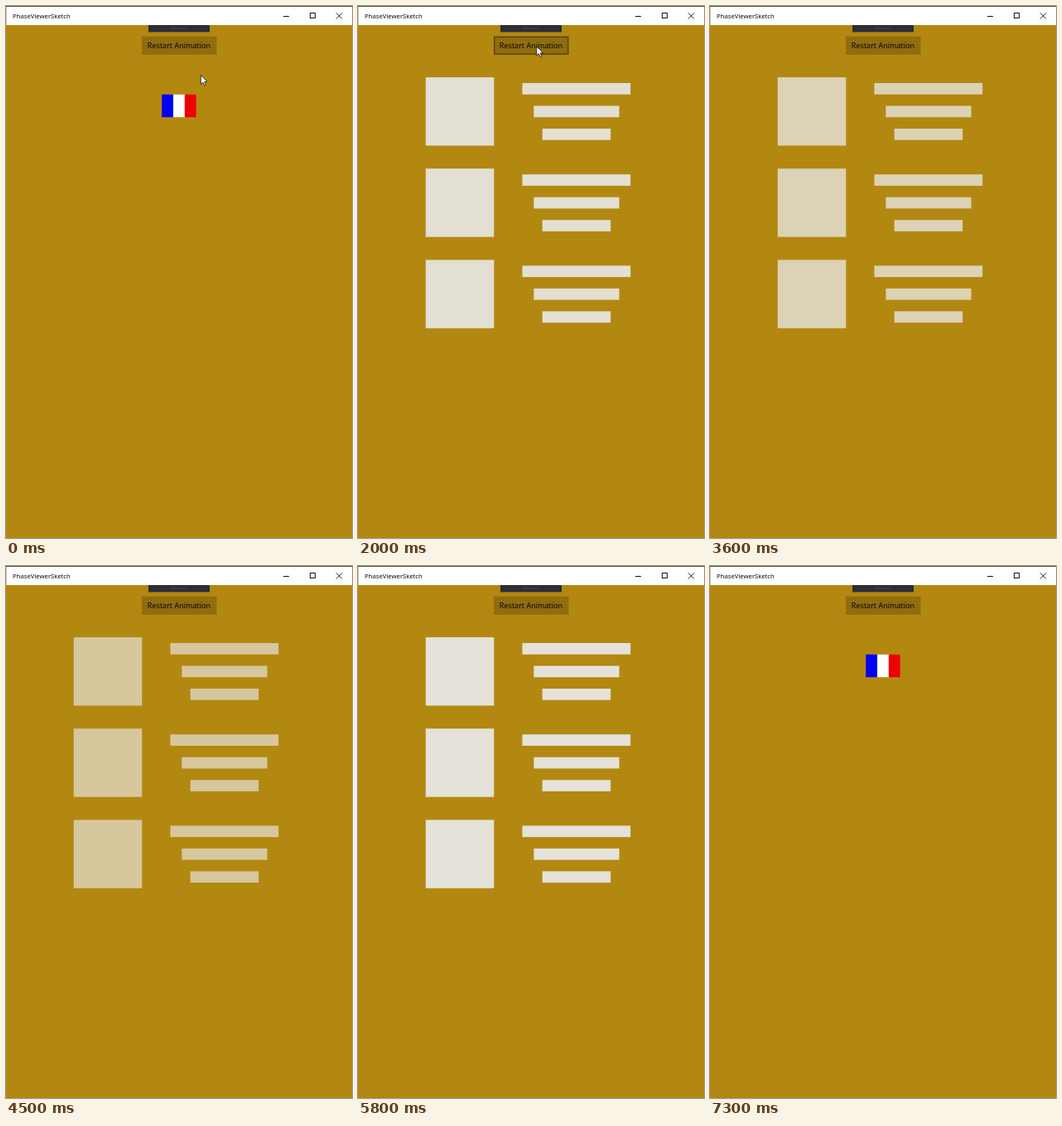
An HTML page with a canvas for the animation above (7.4 s loop, 418 by 642 pixels).

```html
<!DOCTYPE html>
<html lang="en">
<head>
<meta charset="utf-8">
<title>Loader</title>
<style>
html, body { margin: 0; width: 418px; height: 642px; overflow: hidden; background: #b38811; }
canvas { display: block; }
</style>
</head>
<body>
<canvas id="stage" width="418" height="642"></canvas>
<script>
const ctx = document.getElementById('stage').getContext('2d');
const LOOP = 7400;
const LOAD_START = 1944, LOAD_END = 6944, HALF = 500;
const CURSOR_END = 2700;
const FONT = '"Open Sans", "Noto Sans", sans-serif';

// time, x, y of the pointer tip
const path = [
  [300, 235, 83], [600, 224, 61], [950, 224, 61],
  [1300, 211, 22], [1500, 211, 22], [1850, 215.5, 48.5]
];

function rect(x, y, w, h, color) {
  ctx.fillStyle = color;
  ctx.fillRect(x, y, w, h);
}

function line(color, ...points) {
  ctx.strokeStyle = color;
  ctx.lineWidth = 1;
  ctx.beginPath();
  for (const [x1, y1, x2, y2] of points) {
    ctx.moveTo(x1, y1);
    ctx.lineTo(x2, y2);
  }
  ctx.stroke();
}

function text(str, x, y, size, align) {
  ctx.font = `${size}px ${FONT}`;
  ctx.textAlign = align;
  ctx.fillStyle = '#000';
  ctx.fillText(str, x, y);
}

function pointerAt(t) {
  if (t <= path[0][0]) return path[0].slice(1);
  for (let i = 1; i < path.length; i++) {
    const [t0, x0, y0] = path[i - 1], [t1, x1, y1] = path[i];
    if (t < t1) {
      const s = (t - t0) / (t1 - t0);
      const k = s * s * (3 - 2 * s);
      return [x0 + (x1 - x0) * k, y0 + (y1 - y0) * k];
    }
  }
  return path[path.length - 1].slice(1);
}

function drawTitleBar() {
  rect(0, 0, 418, 23, '#fff');
  rect(0, 0, 418, 1, '#4a4a4a');
  rect(0, 1, 0.5, 22, '#888');
  text('PhaseViewerSketch', 8, 14.7, 7.75, 'left');
  line('#111', [335, 12.5, 342, 12.5], [399, 8.5, 406, 15.5], [406, 8.5, 399, 15.5]);
  ctx.strokeRect(367.5, 8.5, 6, 6);
}

function drawToolStrip(hover) {
  rect(172, 23, 74, 8.5, hover ? '#41414b' : '#2d2d38');
  if (!hover) rect(198, 26.5, 21, 1, '#484852');
}

function drawButton(hover) {
  rect(164, 36.7, 90.5, 22, '#906d0e');
  if (hover) {
    ctx.strokeStyle = '#59430a';
    ctx.lineWidth = 1.4;
    ctx.strokeRect(164.7, 37.4, 89, 20.6);
  }
  text('Restart Animation', 209, 51, 9.1, 'center');
}

function drawFlag() {
  rect(188.3, 106.8, 13.8, 27.4, '#0000f4');
  rect(202.1, 106.8, 13.8, 27.4, '#fff');
  rect(215.9, 106.8, 13.8, 27.4, '#f00000');
}

// Alternating fades between full and 60 % opacity
function pulse(t) {
  const n = Math.floor(t / HALF);
  const k = Math.sin((t / HALF - n) * Math.PI / 2);
  return n % 2 ? 0.6 + 0.4 * k : 1 - 0.4 * k;
}

function drawSkeleton(t) {
  const color = '#e7e6e1';
  ctx.globalAlpha = pulse(t);
  for (let i = 0; i < 3; i++) {
    const y = 86 + i * 110.2;
    rect(81.8, y, 82.5, 82.5, color);
    rect(198.5, y + 7, 130.7, 13.7, color);
    rect(212.4, y + 34.5, 103.2, 13.7, color);
    rect(222.7, y + 62, 82.5, 13.7, color);
  }
  ctx.globalAlpha = 1;
}

function drawPointer(x, y) {
  ctx.save();
  ctx.translate(x, y);
  ctx.beginPath();
  ctx.moveTo(0.3, 0.4);
  for (const [px, py] of [[0.3, 11.4], [2.8, 9.1], [4.6, 13], [6.4, 12.2], [4.7, 8.4], [8, 8.1]]) {
    ctx.lineTo(px, py);
  }
  ctx.closePath();
  ctx.fillStyle = '#fff';
  ctx.fill();
  ctx.strokeStyle = '#111';
  ctx.lineWidth = 0.8;
  ctx.stroke();
  ctx.restore();
}

function draw(t) {
  const [x, y] = pointerAt(t);
  const visible = t < CURSOR_END;
  const onStrip = visible && y > 20 && y < 31;
  const onButton = visible && y > 37 && y < 58;

  rect(0, 0, 418, 642, '#b38811');
  drawTitleBar();
  drawToolStrip(onStrip);
  drawButton(onButton);
  if (t >= LOAD_START && t < LOAD_END) drawSkeleton(t - LOAD_START);
  else drawFlag();
  if (visible) drawPointer(x, y);
}

const start = performance.now();
function tick() {
  draw((performance.now() - start) % LOOP);
  requestAnimationFrame(tick);
}
tick();
</script>
</body>
</html>
```
